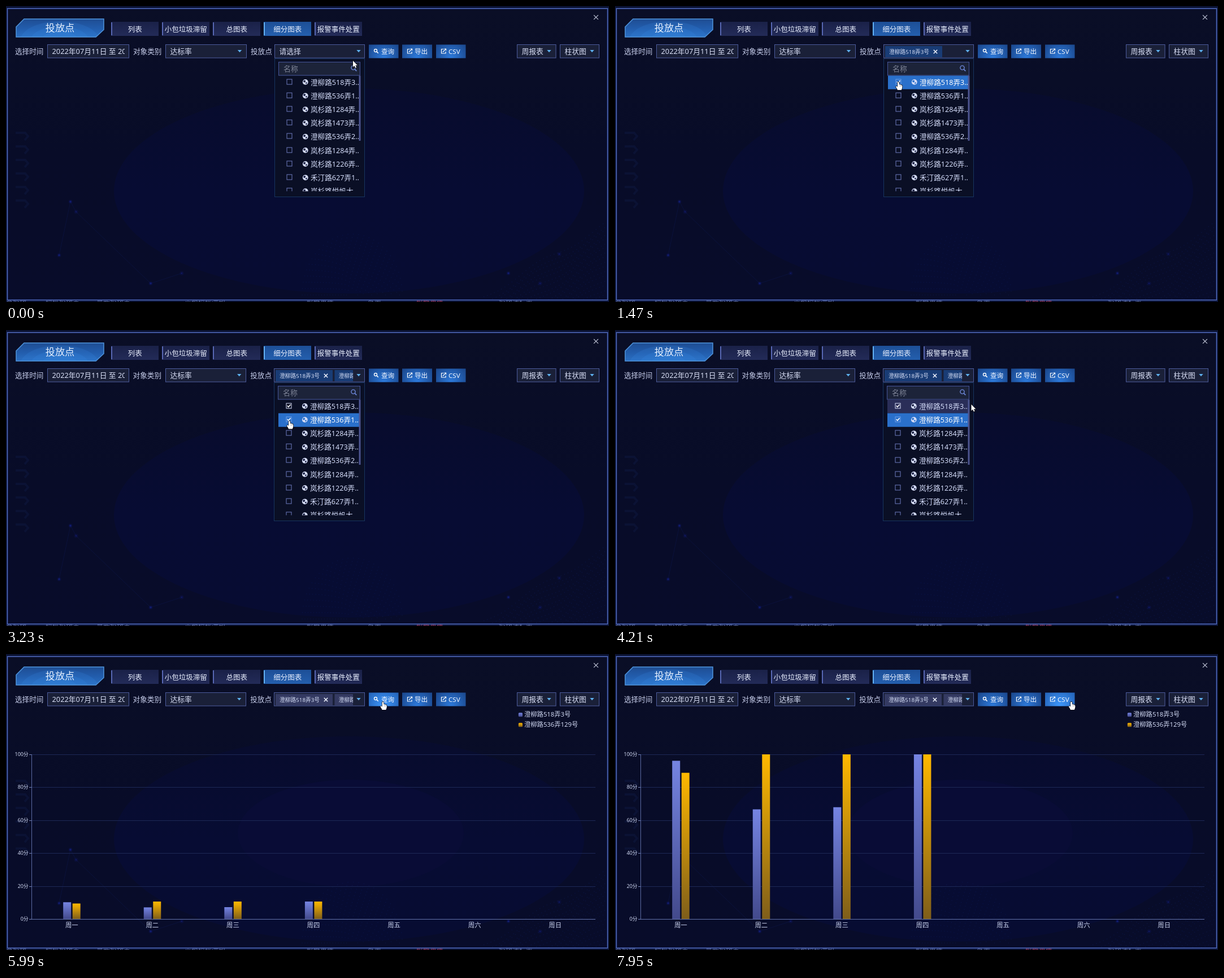
Animation, 1067 px wide and 525 px high, one loop 8000 ms. Source, as an HTML page with a canvas:

```html
<!DOCTYPE html>
<html lang="zh-CN">
<head>
<meta charset="utf-8">
<title>投放点</title>
<style>
html, body { margin: 0; width: 100%; height: 100%; overflow: hidden; background: #080c28; }
canvas { display: block; }
</style>
</head>
<body>
<canvas id="stage" width="1067" height="525"></canvas>
<script>
const c = document.getElementById('stage').getContext('2d');
const LOOP = 8000, PICK_FIRST = 1470, PICK_SECOND = 3230, PRESS = 5600, CHART = 5720;
const ROW_TOP = 123.4, ROW_H = 24.2;
const FONT = '"Noto Sans", "Noto Sans CJK SC", "Noto Sans CJK", sans-serif';
const ROWS = ['澄柳路518弄3..', '澄柳路536弄1..', '岚杉路1284弄..', '岚杉路1473弄..', '澄柳路536弄2..',
  '岚杉路1284弄..', '岚杉路1226弄..', '禾汀路627弄1..', '岚杉路悦帆大..'];
const PLACES = ['澄柳路518弄3号', '澄柳路536弄129号'];
const SERIES = [
  { values: [96.1, 66.6, 67.9, 100], x: -15.1, top: '#7584e2', bottom: '#434a8c' },
  { values: [88.8, 100, 100, 100], x: 1.4, top: '#ffb800', bottom: '#7f5e1a' }
];
// time, pointer shape, tip position
const POINTER = [
  [0, 'arrow', 614, 97], [120, 'arrow', 603, 102], [240, 'arrow', 587, 108],
  [390, 'hand', 566, 125], [510, 'hand', 549, 131], [660, 'hand', 541, 129],
  [780, 'hand', 527, 130], [900, 'hand', 511, 131], [1050, 'hand', 501.5, 135.5],
  [1320, 'hand', 501.5, 134.5], [2310, 'hand', 501.5, 140], [2430, 'hand', 501.5, 150],
  [2550, 'hand', 501.5, 157], [2670, 'hand', 501.5, 161], [3910, 'hand', 500.5, 164],
  [4060, 'hand', 500.5, 165], [4210, 'arrow', 630.5, 132], [4330, 'arrow', 650, 120],
  [4480, 'arrow', 665, 93], [4630, 'hand', 667, 84.5], [7830, 'hand', 740, 84.5],
  [7950, 'hand', 807.5, 84.5]
];
const CHART_STEPS = [5720, 5840, 5990, 6110, 6230, 6350, 6500, 6650, 6770];
const HAND = new Path2D('M-1.4 1.3Q0-.8 1.4 1.3V4.8Q6.8 5 6.8 7.6V10Q6.4 12 5.3 14.5H-1.4Q-2.5 11.8-4.6 9Q-4.2 6.8-1.4 8.8Z');
const ARROW = new Path2D('M0 0V11.2L2.5 8.9 4.3 12.8 6.2 12 4.4 8.2H7.9Z');

function box(x, y, w, h, fill, border) {
  if (fill) { c.fillStyle = fill; c.fillRect(x, y, w, h); }
  if (border) { c.strokeStyle = border; c.lineWidth = 1; c.strokeRect(x + .5, y + .5, w - 1, h - 1); }
}
function text(s, x, cy, size, color = '#c6cdea', align = 'left', weight = 400) {
  c.font = `${weight} ${size}px ${FONT}`;
  c.textAlign = align;
  c.fillStyle = color;
  c.fillText(s, x, cy + size * .37);
}
function line(points, color, width = 1) {
  c.beginPath();
  points.forEach(([x, y]) => c.lineTo(x, y));
  c.strokeStyle = color;
  c.lineWidth = width;
  c.stroke();
}
function shape(points, fill) {
  c.beginPath();
  points.forEach(([x, y]) => c.lineTo(x, y));
  c.closePath();
  c.fillStyle = fill;
  c.fill();
}
function disc(x, y, rx, ry, fill) {
  c.beginPath();
  c.ellipse(x, y, rx, ry, 0, 0, 7);
  c.fillStyle = fill;
  c.fill();
}
function clipped(x, y, w, h, draw) {
  c.save();
  c.beginPath();
  c.rect(x, y, w, h);
  c.clip();
  draw();
  c.restore();
}
function vertical(y0, y1, ...colors) {
  const g = c.createLinearGradient(0, y0, 0, y1);
  colors.forEach((color, i) => g.addColorStop(i / (colors.length - 1), color));
  return g;
}
const caret = (x, y = 80) => shape([[x - 3.7, y - 2], [x + 3.7, y - 2], [x, y + 2.2]], '#5eb1ef');
const cross = (x, y, r, color, w) => {
  line([[x - r, y - r], [x + r, y + r]], color, w);
  line([[x + r, y - r], [x - r, y + r]], color, w);
};
function lens(x, y, r, color, w) {
  c.beginPath();
  c.arc(x - 1, y - 1, r, 0, 7);
  c.strokeStyle = color;
  c.lineWidth = w;
  c.stroke();
  line([[x - 1 + r * .7, y - 1 + r * .7], [x + r + 1.2, y + r + 1.2]], color, w + .3);
}

function backdrop(chartShown) {
  box(0, 0, 1067, 525, '#0b1230');
  box(2, 4, 1063, 518, vertical(4, 522, '#0a0e26', '#080c28', '#080c2a'));
  disc(607, 328, 416, 182, vertical(146, 510, '#080c2d', '#070c33', '#070c32'));
  if (chartShown) disc(610, 318, 200, 95, '#090c36');

  for (let i = 0; i < 6; i++) {
    const y = 225 + i * 24;
    line([[17, y], [34, y], [39, y + 6], [33, y + 13]], '#0b1234', 4);
  }
  c.fillStyle = 'rgba(28,56,150,.22)';
  for (let row = 0; row < 17; row++) {
    for (let i = 0; i < 36; i++) {
      const x = 845 + i * 6.2 + row % 2 * 3;
      const y = 515 - i * 3.7 + row * 7.5 + Math.sin(i * .3 + row * .2) * 5;
      if (y < 520 && x < 1062) c.fillRect(x, y, 1.3, 1.3);
    }
    const r = 12 + row * 6, count = 4 + row * 1.6;
    for (let i = 0; i <= count; i++) {
      const angle = Math.PI * (1 + i / count);
      c.fillRect(612 + Math.cos(angle) * r * .82, 512 + Math.sin(angle) * r, 1.2, 1.2);
    }
  }
  line([[114, 347], [94, 442]], 'rgba(24,44,130,.2)');
  line([[114, 347], [124, 365], [256, 492], [311, 474]], 'rgba(24,44,130,.2)');
  [[114, 347], [124, 365], [94, 442], [311, 474], [256, 492], [945, 492], [889, 474], [979, 440]]
    .forEach(([x, y], i) => {
      disc(x, y, 3.5, 3.5, 'rgba(18,32,130,.2)');
      disc(x, y, i % 2 ? 1.1 : 1.8, i % 2 ? 1.1 : 1.8, '#111c70');
    });

  clipped(0, 522, 1067, 3, () => {
    [[0, '总投放'], [70, '垃圾投放点'], [160, '最新投放点'], [316, '小包垃圾滞留'], [532, '报警事件'], [640, '处置'], [872, '投放达标率']]
      .forEach(([x, s]) => text(s, x, 527, 12, '#56638f'));
    text('报警事件', 726, 527, 12, '#8d3655');
  });
  c.strokeStyle = 'rgba(56,86,190,.3)';
  c.lineWidth = 3;
  c.strokeRect(2.5, 4.5, 1062, 517);
  box(2, 4, 1063, 518, null, '#5a74c4');
}

function header() {
  const plate = [[32, 23], [173, 23], [173, 42], [159, 55], [18, 55], [18, 37]];
  c.save();
  shape(plate, vertical(22, 56, '#1e4c92', '#225cab', '#2b70c4'));
  c.clip();
  [70, 52, 34].forEach(r => disc(95, 62, r, r * .5, 'rgba(60,145,235,.16)'));
  c.restore();
  line([...plate, plate[0], plate[1]], '#4f94dc', 1.5);
  text('投放点', 95.5, 38.5, 17.2, '#e4efff', 'center');
  ['列表', '小包垃圾滞留', '总图表', '细分图表', '报警事件处置'].forEach((name, i) => {
    const x = 186 + i * 90, active = i === 3;
    box(x, 28, 84, 25, active ? vertical(28, 53, '#1d4f97', '#245fae') : vertical(28, 53, '#1a2148', '#232b58'));
    box(x, 29, 2, 23, active ? '#64b2f4' : '#5868b4');
    text(name, x + 42.3, 41, 12.5, '#eaf0ff', 'center');
  });
  cross(1044, 20, 3.9, '#b9bed0', 1.3);
}

function field(x, w, label, caretX) {
  box(x, 68, w, 24.5, '#1a2038', '#4c5b9c');
  clipped(x, 68, w - 8, 25, () => text(label, x + 8.5, 80, 12.8, '#d8def5'));
  if (caretX) caret(caretX);
}

function button(x, w, label, icon, state) {
  const [edge, glow] = { idle: ['#1b478c', '#2c78d8'], hover: ['#2463b8', '#3d96fa'], press: ['#183f7e', '#2764b6'] }[state];
  const g = c.createRadialGradient(x + w / 2, 93, 2, x + w / 2, 88, 32);
  g.addColorStop(0, glow);
  g.addColorStop(1, edge);
  box(x, 68.5, w, 24, g);
  const ix = x + 13.5;
  if (icon === 'lens') lens(ix - .5, 80, 2.5, '#fff', 1.3);
  else {
    line([[ix, 76.5], [ix - 4, 76.5], [ix - 4, 84], [ix + 3.5, 84], [ix + 3.5, 81]], '#fff', 1.2);
    line([[ix - 1.5, 81.5], [ix + 3.7, 76.3]], '#fff', 1.2);
    line([[ix + 1, 76], [ix + 4, 76], [ix + 4, 79]], '#fff', 1.2);
  }
  text(label, x + 22, 80.3, 11.6, '#f2f6ff', 'left', 500);
}

function toolbar(t, pointer, chartShown) {
  const dx = t >= PICK_SECOND ? -.8 : 0;
  text('选择时间', 16, 80, 12.6);
  field(73, 145, '2022年07月11日 至 2022年07月17日');
  text('对象类别', 225 + dx / 2, 80, 12.6);
  field(282, 144 + Math.round(dx), '达标率', 413.5 + dx);
  text('投放点', 433 + dx, 80, 12.6);

  const left = 475 + Math.round(dx);
  const count = t >= PICK_SECOND ? 2 : t >= PICK_FIRST ? 1 : 0;
  field(left, 635 - left, count ? '' : '请选择');
  clipped(left, 69, 614 - left, 23, () => {
    for (let i = 0; i < count; i++) {
      const x = left + 3 + i * 104.5;
      box(x, 71, 101, 20, chartShown ? '#343a62' : '#193c75');
      text(PLACES[i], x + 7, 81, 9.75, '#d5def6');
      cross(x + 89, 81, 3.2, '#f0f4ff', 1.5);
    }
  });
  caret(624);

  const overBar = pointer[3] > 68 && pointer[3] < 93;
  [[642, 52.5, '查询', 'lens'], [701, 53, '导出', 'export'], [761, 52.5, 'CSV', 'export']].forEach(([x, w, label, icon]) => {
    const over = overBar && pointer[1] === 'hand' && pointer[2] > x && pointer[2] < x + w;
    button(x, w, label, icon, !over ? 'idle' : t >= PRESS && t < CHART ? 'press' : 'hover');
  });
  field(904, 69.5, '周报表', 961);
  field(980, 70, '柱状图', 1037);
  return left;
}

function checkbox(x, y, checked, selected) {
  c.strokeStyle = selected ? '#6f9ee8' : checked ? '#d8def8' : '#6f7cc0';
  c.lineWidth = 1;
  c.strokeRect(x - 4.5, y - 4.5, 9, 9);
  if (checked) line([[x - 2.7, y - .3], [x - .7, y + 2], [x + 3, y - 2.3]], '#fff', 1.6);
}

function globe(x, y, land) {
  disc(x, y, 4.9, 4.9, '#d5dcf7');
  shape([[x - 3.8, y - 2], [x - 1, y - 3.6], [x + .6, y - 1.5], [x - 1.2, y + .6], [x - 3, y + .4]], land);
  shape([[x + .4, y + .4], [x + 3.4, y + .8], [x + 1.6, y + 3.7], [x + .5, y + 2.5]], land);
}

function dropdown(t, pointer, left) {
  box(left, 93, 635 - left, 246, '#0a0f25', '#17355f');
  box(left + 7, 99, 620 - left, 24.5, '#1c2339', '#45549a');
  text('名称', left + 16, 111.3, 12.9, '#7d8396');
  lens(615.5, 110.5, 3.6, '#6f8ade', 1.4);
  const hovered = pointer[2] > 482 && pointer[2] < 634 ? Math.floor((pointer[3] - ROW_TOP) / ROW_H) : -1;
  const selected = t >= PICK_SECOND ? 1 : t >= PICK_FIRST ? 0 : -1;
  clipped(left + 8, 123.5, 617 - left, 205, () => {
    ROWS.forEach((name, i) => {
      const top = ROW_TOP + i * ROW_H, y = top + 11.2, active = i === selected;
      if (active || i === hovered) box(left + 8, top, 150, ROW_H, active ? '#2a70cb' : '#2a2e58');
      checkbox(left + 26.5, Math.round(y) - .5, i <= selected, active);
      globe(left + 54.8, y + .3, active ? '#2a70cb' : '#151b3c');
      text(name, left + 64, y + .4, 12.6, active ? '#fff' : '#d2daf7');
    });
  });
  box(624.5, 123.5, 3, 115.5, '#4d5590');
}

const cubicInOut = k => k < .5 ? 4 * k ** 3 : 1 - (2 - 2 * k) ** 3 / 2;

function chart(t) {
  const x0 = 45, x1 = 1043, base = 470, height = 292, slot = (x1 - x0) / 7;
  const now = CHART_STEPS.filter(step => step <= t).pop();
  const grown = cubicInOut(Math.min(1, Math.max(0, (now - 5686) / 1020)));
  for (let i = 0; i <= 5; i++) {
    const y = Math.round(base - height * i / 5) + .5;
    line([[x0, y], [x1, y]], i ? '#1d2856' : '#6272ab');
    line([[41, y], [x0, y]], '#7482b6');
    text(`${i * 20}分`, 39.5, y - 1, 8.8, '#d0d8f2', 'right', 500);
  }
  line([[x0 + .5, 178], [x0 + .5, base]], '#5b6aa2');
  SERIES.forEach(({ values, x, top, bottom }) => values.forEach((value, i) => {
    const h = height * value / 100 * grown;
    box(x0 + slot * (i + .5) + x, base - h, 14, h, vertical(base - h, base, top, bottom));
  }));
  [...'一二三四五六日'].forEach((day, i) => text('周' + day, x0 + slot * (i + .5), 480.5, 11.4, '#cdd5f0', 'center'));
  PLACES.forEach((place, i) => {
    const y = 107.3 + i * 18;
    c.beginPath();
    c.roundRect(906.8, y - 3, 7.2, 7, 1.5);
    c.fillStyle = vertical(y - 3, y + 4, SERIES[i].top, SERIES[i].bottom);
    c.fill();
    text(place, 917, y, 11.3, '#d0d8f2');
  });
}

function drawPointer([, kind, x, y]) {
  c.save();
  c.translate(x, y);
  const path = kind === 'hand' ? HAND : ARROW;
  c.strokeStyle = '#06070f';
  c.lineWidth = 1.4;
  c.lineJoin = 'round';
  c.stroke(path);
  c.fillStyle = '#fff';
  c.fill(path);
  if (kind === 'hand') [2.8, 4.8].forEach(fx => line([[fx, 6], [fx, 8.5]], '#555b70', .5));
  c.restore();
}

function frame() {
  const t = performance.now() % LOOP;
  const pointer = POINTER.filter(([start]) => start <= t).pop();
  const chartShown = t >= CHART;
  backdrop(chartShown);
  header();
  const left = toolbar(t, pointer, chartShown);
  if (chartShown) chart(t);
  else dropdown(t, pointer, left);
  drawPointer(pointer);
  requestAnimationFrame(frame);
}
frame();
</script>
</body>
</html>
```
